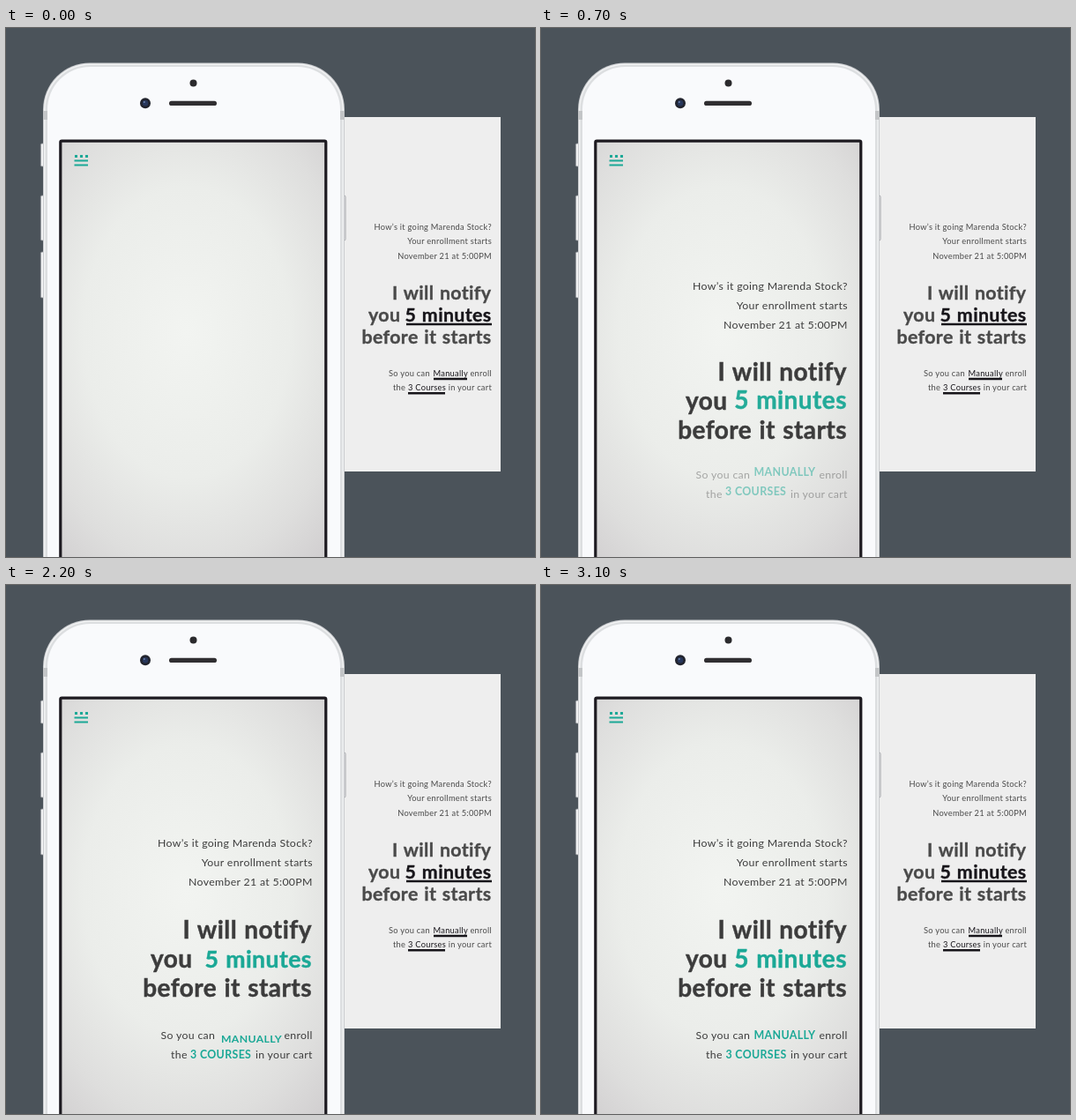
These frames come from a looping animation (600 by 600 pixels, 3700 ms). An HTML page:

```html
<!DOCTYPE html>
<html lang="en">
<head>
<meta charset="utf-8">
<title>Enrollment reminder</title>
<style>
  html, body { margin: 0; width: 100%; height: 100%; overflow: hidden; background: #4b535a; }
  svg { display: block; width: 600px; height: 600px; }
  text { font-family: Lato, "Open Sans", sans-serif; fill: #3c3c3c; }
  .body { font-size: 12.3px; letter-spacing: .33px; }
  .head { font-size: 28px; font-weight: 700; letter-spacing: .45px; word-spacing: 1px; stroke: #3c3c3c; stroke-width: .45; }
  .key { font-size: 12.4px; font-weight: 700; letter-spacing: .35px; }
  .teal { fill: #1ba896; }
  .head.teal { stroke: #1ba896; }
  .card text { fill: #4a4a4a; }
  .card .body { font-size: 9.3px; letter-spacing: .27px; }
  .card .head { font-size: 21.4px; letter-spacing: .35px; stroke: #4a4a4a; stroke-width: .35; }
  .card .dark { fill: #17151a; }
  .card .head.dark { stroke: #17151a; }
  .end { text-anchor: end; }
</style>
</head>
<body>
<svg viewBox="0 0 600 600">
  <defs>
    <radialGradient id="glow" gradientUnits="userSpaceOnUse" cx="0" cy="0" r="1"
      gradientTransform="translate(205 345) scale(235 330)">
      <stop offset="0" stop-color="#f2f4f1"/>
      <stop offset=".5" stop-color="#ebedea"/>
      <stop offset=".8" stop-color="#dededd"/>
      <stop offset="1" stop-color="#d2d0d1"/>
    </radialGradient>
  </defs>
  <rect width="600" height="600" fill="#4b535a"/>

  <g class="card">
    <rect x="370" y="101" width="191" height="402" fill="#eee"/>
    <text class="body end" x="551" y="228.5">How’s it going Marenda Stock?</text>
    <text class="body end" x="551" y="245">Your enrollment starts</text>
    <text class="body end" x="551" y="262">November 21 at 5:00PM</text>
    <text class="head end" x="550.5" y="307.5">I will notify</text>
    <text class="head" x="411" y="333">you</text>
    <text class="head dark end" x="550.5" y="333">5 minutes</text>
    <text class="head end" x="550.5" y="358">before it starts</text>
    <text class="body" x="434" y="394.5">So you can</text>
    <text class="body dark" x="484.5" y="394.5">Manually</text>
    <text class="body end" x="551" y="394.5">enroll</text>
    <text class="body" x="439" y="411">the</text>
    <text class="body dark" x="456" y="411">3 Courses</text>
    <text class="body end" x="551" y="411">in your cart</text>
    <path d="M454 336h97M485 398h38M456 414.2h42" stroke="#17151a" stroke-width="2.4"/>
  </g>

  <g fill="#f0f1f2" stroke="#8b8f93" stroke-width=".8">
    <rect x="39.4" y="131" width="5" height="26" rx="1.5"/>
    <rect x="39.4" y="190" width="5" height="51" rx="1.5"/>
    <rect x="39.4" y="254" width="5" height="52" rx="1.5"/>
    <rect x="380" y="190" width="5" height="51" rx="1.5"/>
  </g>
  <rect x="42" y="39.5" width="342" height="640" rx="53" fill="#c9cbce"/>
  <rect x="43" y="40.5" width="340" height="640" rx="52" fill="#f1f2f3"/>
  <rect x="44.5" y="42" width="337" height="640" rx="50.5" fill="#dcdee0"/>
  <path d="M42 94h6v10h-6zM378 94h6v10h-6z" fill="#c3c5c7"/>
  <rect x="47" y="44" width="332" height="640" rx="48.5" fill="#f9fafc"/>

  <circle cx="212.5" cy="62.5" r="4" fill="#2b2a2d"/>
  <circle cx="158" cy="85.3" r="6" fill="#22242e"/>
  <circle cx="158" cy="85.3" r="3.2" fill="#28375c"/>
  <circle cx="156.8" cy="84" r="1" fill="#6d82ad"/>
  <rect x="185" y="82.7" width="54" height="5.4" rx="2.7" fill="#302e31"/>

  <rect x="61.8" y="128.1" width="301" height="500" rx="1.5" fill="url(#glow)" stroke="#1d1a20" stroke-width="3.2"/>
  <path d="M78 144h3v3h-3zM84 144h3v3h-3zM90 144h3v3h-3zM77.5 149.6H93v1.8H77.5zM77.5 154.4H93v2H77.5z" fill="#1ba896"/>
  <g id="message"></g>
</svg>

<script>
const LOOP = 3700, STEP = 100;
const message = document.getElementById('message');

// drop: [start, duration, height]; fade: [start, duration]
const intro = { drop: [180, 430, 15], fade: [170, 300] };
const title = { drop: [270, 530, 21], fade: [300, 370] };
const note = { drop: [490, 410, 17], fade: [490, 520] };
const keyDrop = { drop: [490, 480, 22], fade: [485, 430] };

// nudge: a short shift and shrink that springs back
const minutes = { drop: [460, 400, 15], fade: [470, 240],
  nudge: { from: 1780, to: 2450, dx: 0, dy: 0, shrink: .063 } };
const manually = { ...keyDrop, nudge: { from: 2050, to: 2750, dx: 2.8, dy: 4.4, shrink: .015 } };
const courses = { ...keyDrop, nudge: { from: 2480, to: 3120, dx: 7, dy: 4.4, shrink: .043 } };

const parts = [
  [347.8, 297, 'How’s it going Marenda Stock?', 'body end', intro],
  [347.8, 319, 'Your enrollment starts', 'body end', intro],
  [347.8, 341, 'November 21 at 5:00PM', 'body end', intro],
  [347, 401, 'I will notify', 'head end', title],
  [164, 434, 'you', 'head', title],
  [347, 434, '5 minutes', 'head teal end', minutes],
  [347, 467, 'before it starts', 'head end', title],
  [175.5, 515, 'So you can', 'body', note],
  [241.5, 515, 'MANUALLY', 'key teal', manually],
  [347.8, 515, 'enroll', 'body end', note],
  [187, 537, 'the', 'body', note],
  [209, 537, '3 COURSES', 'key teal', courses],
  [347.8, 537, 'in your cart', 'body end', note],
].map(([x, y, label, style, motion]) => {
  const node = document.createElementNS('http://www.w3.org/2000/svg', 'text');
  node.textContent = label;
  node.setAttribute('class', style);
  message.append(node);
  return { x, y, node, motion };
});

const progress = (t, start, duration) => Math.min(1, Math.max(0, (t - start) / duration));

function draw(now) {
  const t = Math.floor((now % LOOP) / STEP) * STEP;
  for (const { x, y, node, motion: { drop, fade, nudge } } of parts) {
    let px = x, scale = 1;
    let py = y - drop[2] * (1 - progress(t, drop[0], drop[1])) ** 2;
    if (nudge) {
      const pulse = Math.sin(Math.PI * progress(t, nudge.from, nudge.to - nudge.from) ** .7);
      px += nudge.dx * pulse;
      py += nudge.dy * pulse;
      scale -= nudge.shrink * pulse;
    }
    node.setAttribute('transform', `translate(${px} ${py}) scale(${scale})`);
    node.setAttribute('opacity', progress(t, ...fade));
  }
  requestAnimationFrame(draw);
}
draw(0);
</script>
</body>
</html>
```
